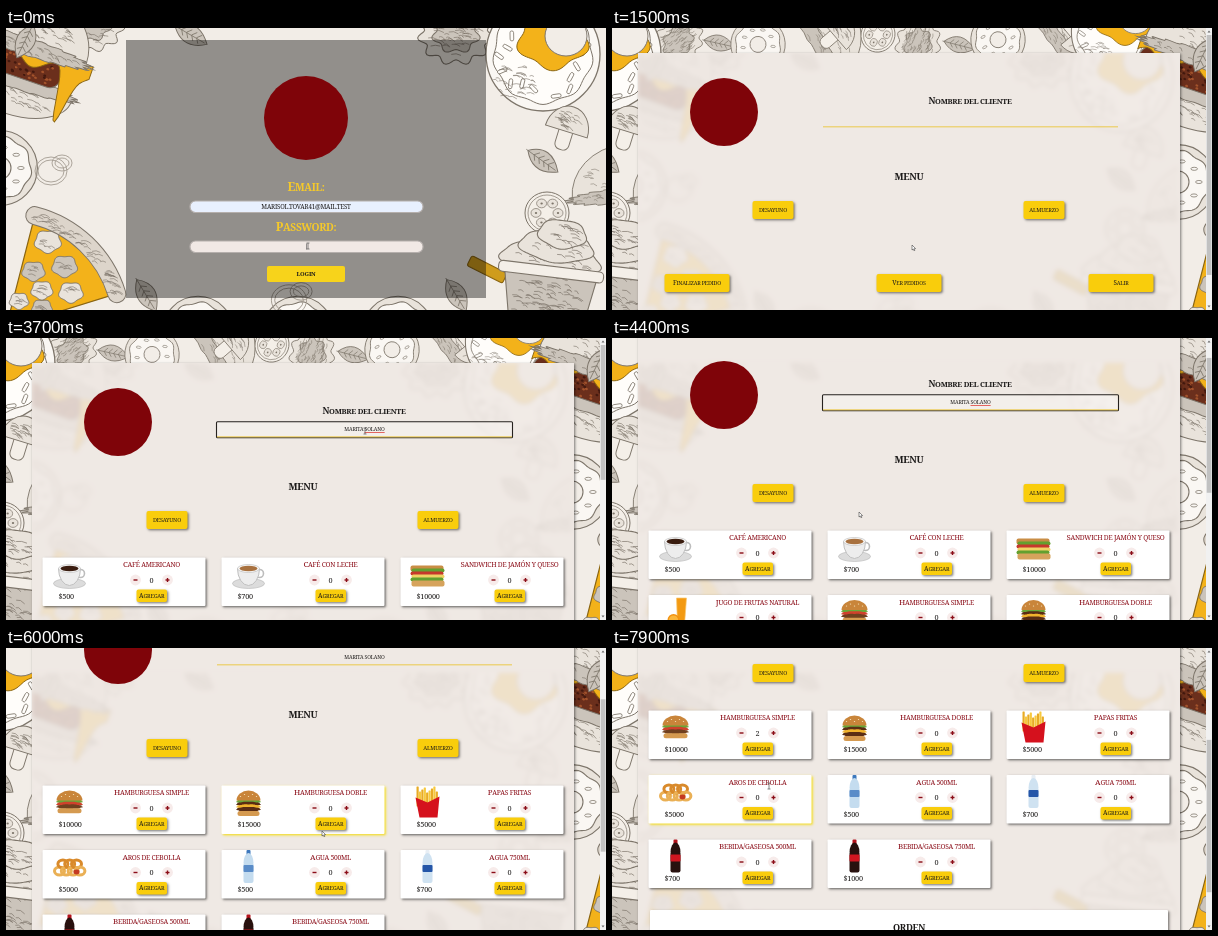
An HTML page with a canvas for the animation above (8000 ms loop, 600 by 282 pixels).

```html
<!DOCTYPE html>
<html lang="es">
<head>
<meta charset="utf-8">
<title>Pedidos</title>
<style>
html, body { margin: 0; width: 100%; height: 100%; overflow: hidden; background: #f1ece6; }
canvas { display: block; width: 600px; height: 282px; }
</style>
</head>
<body>
<canvas id="stage" width="600" height="282"></canvas>
<script>
const W = 600, H = 282, LOOP = 8000, TAU = Math.PI * 2;
const INK = '#7d756a', CREAM = '#f2ede7', YELLOW = '#f9cd0c', RED = '#7f0409', BLACK = '#1c1a19';
const CHEESE = '#f3b21a', OCHRE = '#8a6512', PALE = '#e9e3db', GREY = '#cbc4bb', WHITE = '#faf7f3';
const c = document.getElementById('stage').getContext('2d');

// ---------- shape helpers ----------
let seed = 7;
const rnd = () => (seed = (seed * 16807) % 2147483647) / 2147483647;
const loop = (n, fn) => { for (let i = 0; i < n; i++) fn(i); };

function paint(g, fill, stroke, w = 1) {
  if (fill) { g.fillStyle = fill; g.fill(); }
  if (stroke) { g.strokeStyle = stroke; g.lineWidth = w; g.stroke(); }
}
function oval(g, x, y, rx, ry, fill, stroke, w) {
  g.beginPath();
  g.ellipse(x, y, rx, ry, 0, 0, TAU);
  paint(g, fill, stroke, w);
}
// half an ellipse, rounded side up unless down is set
function dome(g, x, y, rx, ry, fill, stroke, down = false) {
  g.beginPath();
  g.ellipse(x, y, rx, ry, 0, 0, Math.PI, !down);
  g.closePath();
  paint(g, fill, stroke);
}
function box(g, x, y, w, h, r, fill, stroke, lw) {
  g.beginPath();
  g.roundRect(x, y, w, h, r);
  paint(g, fill, stroke, lw);
}
function poly(g, pts, fill, stroke, w) {
  g.beginPath();
  pts.forEach(p => g.lineTo(...p));
  g.closePath();
  paint(g, fill, stroke, w);
}
// ellipse with a wavy edge
function wavy(g, x, y, rx, ry, waves, depth, fill, stroke = INK) {
  g.beginPath();
  loop(96, i => {
    const a = i / 96 * TAU, k = 1 + depth * Math.sin(a * waves);
    g.lineTo(x + Math.cos(a) * rx * k, y + Math.sin(a) * ry * k);
  });
  g.closePath();
  paint(g, fill, stroke);
}
// short pen strokes scattered inside an ellipse
function hatch(g, n, x, y, rx, ry) {
  g.beginPath();
  loop(n, () => {
    const a = rnd() * TAU, r = Math.sqrt(rnd()), l = 4 + rnd() * 6;
    const px = x + Math.cos(a) * r * rx - l / 2, py = y + Math.sin(a) * r * ry;
    g.moveTo(px, py);
    g.quadraticCurveTo(px + l / 2, py - 1.5, px + l, py + 3 * rnd());
  });
  paint(g, null, INK, .6);
}
function put(g, draw, x, y, s = 1, r = 0) {
  g.save();
  g.translate(x, y);
  g.rotate(r);
  g.scale(s, s);
  draw(g);
  g.restore();
}

// ---------- sketched food ----------
function bun(g) {
  dome(g, 0, -22, 66, 58, PALE, INK);
  hatch(g, 50, 0, -44, 48, 16);
  wavy(g, 0, -20, 70, 9, 22, .07, GREY);
  hatch(g, 30, 0, -20, 60, 6);
}
function burger(g) {
  dome(g, 0, 20, 64, 34, PALE, INK, true);
  hatch(g, 50, 0, 34, 46, 12);
  wavy(g, 0, 18, 68, 8, 20, .06, GREY);
  box(g, -66, -16, 112, 30, 12, '#6b2f1c', INK);
  loop(70, i => oval(g, -60 + rnd() * 100, -8 + rnd() * 20, 1.6, 1.2, i % 2 ? '#a3532c' : '#43190f'));
  g.beginPath();
  g.moveTo(-70, -22);
  for (let x = -70; x <= 74; x += 2) g.lineTo(x, -7 + 6 * Math.sin(x * .13) + 50 * Math.exp(-(((x - 53) / 7) ** 2)));
  g.lineTo(74, -22);
  g.closePath();
  paint(g, CHEESE, OCHRE);
  bun(g);
}
function donut(g) {
  oval(g, 0, 0, 57, 57, WHITE, INK, 1.3);
  wavy(g, 0, 0, 49, 49, 9, .03, '#fffdfa');
  loop(18, i => put(g, () => box(g, -5, -1.8, 10, 3.6, 2, '#fffdfa', INK, .8),
    Math.cos(i * 2.4) * (36 + i % 2 * 8), Math.sin(i * 2.4) * (36 + i % 2 * 8), 1, i * 1.7));
  wavy(g, 10, -14, 34, 28, 5, .1, CHEESE, OCHRE);
  oval(g, 23, -18, 21, 20, CREAM, INK);
  hatch(g, 30, -30, 28, 22, 20);
}
function plainDonut(g) {
  oval(g, 0, 0, 34, 34, PALE, INK);
  wavy(g, 0, 0, 28, 28, 8, .04, WHITE);
  oval(g, 0, 0, 10, 10, CREAM, INK);
  loop(9, i => oval(g, Math.cos(i * .7) * 19, Math.sin(i * .7) * 19, 3, 1.4, null, INK, .7));
}
// wedge with its tip at the origin
function pizza(g) {
  const from = -1.32, to = -.3;
  g.beginPath();
  g.moveTo(0, 0);
  g.arc(0, 0, 112, from, to);
  g.closePath();
  paint(g, CHEESE, OCHRE, 1.2);
  loop(7, i => {
    const a = from + .2 + (i % 3) * .31, r = 96 - i * 11, s = 13 - i * .6;
    wavy(g, Math.cos(a) * r, Math.sin(a) * r, s, s * .85, 5, .08, i % 2 ? GREY : PALE);
    hatch(g, 6, Math.cos(a) * r, Math.sin(a) * r, s * .5, s * .5);
  });
  g.lineCap = 'round';
  for (const [w, col] of [[19, INK], [17, '#ddd5cb']]) {
    g.beginPath();
    g.arc(0, 0, 116, from, to);
    paint(g, null, col, w);
  }
  loop(60, () => {
    const a = from + rnd() * (to - from), r = 110 + rnd() * 10;
    hatch(g, 1, Math.cos(a) * r, Math.sin(a) * r, 1, 1);
  });
}
function cup(g) {
  put(g, () => box(g, -18, -5, 36, 10, 2, '#cf9c1c', OCHRE), -58, 12, 1, .35);
  loop(3, i => {
    wavy(g, -2 + i * 4, -4 - i * 12, 46 - i * 12, 15 - i, 5, .05, PALE);
    hatch(g, 16, i * 4, -4 - i * 12, 36 - i * 10, 9);
  });
  poly(g, [[-42, 10], [42, 10], [30, 80], [-28, 80]], GREY, INK);
  hatch(g, 110, 0, 40, 30, 34);
  box(g, -48, 2, 96, 10, 4, '#f4efe8', INK);
}
function leaf(g) {
  g.beginPath();
  g.moveTo(-18, 0);
  g.quadraticCurveTo(0, -20, 21, 1);
  g.quadraticCurveTo(0, 19, -18, 0);
  paint(g, GREY, INK);
  g.beginPath();
  g.moveTo(-20, 0);
  g.lineTo(18, 1);
  for (const s of [-1, 1]) loop(4, i => { g.moveTo(i * 6 - 10, 0); g.lineTo(i * 6 - 6, 5 * s); });
  paint(g, null, INK, .8);
}
function onion(g) {
  loop(4, i => oval(g, i > 1 ? 11 : 0, i > 1 ? -6 : 2, 16 - i * 3, 14 - i * 3, null, '#a49c92', .9));
}
function mushroom(g) {
  box(g, -8, 0, 15, 26, 6, '#f4efe8', INK);
  dome(g, 0, 6, 23, 27, PALE, INK);
  hatch(g, 24, 0, -6, 13, 9);
}
function tomato(g) {
  oval(g, 0, 0, 22, 21, '#f4efe8', INK);
  oval(g, 0, 0, 19, 18, null, INK, .7);
  loop(6, i => {
    const x = Math.cos(i * 1.05) * 11, y = Math.sin(i * 1.05) * 11;
    oval(g, x, y, 5, 4.4, PALE, INK, .7);
    oval(g, x, y, 1.2, 1, INK);
  });
}
function lettuce(g) {
  wavy(g, 0, 0, 32, 26, 11, .1, PALE);
  wavy(g, 0, 0, 20, 16, 7, .12, GREY);
  hatch(g, 60, 0, 0, 24, 20);
}

// ---------- backdrops ----------
function layer(draw) {
  const cv = document.createElement('canvas');
  cv.width = W;
  cv.height = H;
  const g = cv.getContext('2d');
  g.fillStyle = CREAM;
  g.fillRect(0, 0, W, H);
  draw(g);
  return cv;
}
function scenery(g) {
  loop(3, i => put(g, plainDonut, 192 + i * 100, 304, 1.05));
  put(g, plainDonut, -6, 140, 1.1);
  put(g, lettuce, 84, -4);
  put(g, lettuce, 450, 6, 1.1);
  put(g, burger, 14, 36, .95, .33);
  put(g, pizza, 0, 300);
  put(g, onion, 45, 141);
  put(g, onion, 283, 270, 1.1);
  put(g, donut, 537, 26);
  put(g, mushroom, 562, 98, .95, .3);
  put(g, tomato, 541, 185);
  put(g, bun, 624, 184, .85, -.1);
  put(g, cup, 546, 236, 1.1, .12);
  for (const [x, y, r] of [[20, 12, 2], [184, 6, .5], [140, 266, 1], [450, 266, 1], [536, 132, .6]]) put(g, leaf, x, y, .95, r);
}
const loginBg = layer(scenery);
// the same drawing repeats past both sides, with a row of trimmings between
const menuBg = layer(g => {
  const trimmings = [lettuce, leaf, plainDonut, bun, mushroom, tomato];
  loop(12, i => put(g, trimmings[i % 6], 66 + i * 40, 4 + rnd() * 14, .8, rnd() * 3));
  put(g, donut, 505, 4, .8);
  put(g, scenery, -545, 0);
  put(g, scenery, 572, 14);
});
const frost = layer(g => {
  g.filter = 'blur(2px)';
  g.drawImage(loginBg, 26, 25, W * .9, H * .95);
  g.filter = 'none';
  g.fillStyle = 'rgba(239,233,228,.87)';
  g.fillRect(0, 0, W, H);
});

// ---------- text ----------
// small < 1 sets the letters after the first as small capitals; align 0 left, .5 centre
function txt(s, x, y, size, color, { weight = 500, align = .5, small = 1 } = {}) {
  const runs = [[s[0] || '', size], [s.slice(1), size * small]].map(r => [r[0].toUpperCase(), r[1]]);
  const set = z => {
    c.font = `${weight} ${z}px "Noto Serif", serif`;
    c.letterSpacing = `${-.03 * size}px`;
  };
  const widths = runs.map(([str, z]) => (set(z), c.measureText(str).width));
  const full = widths[0] + widths[1];
  let px = x - full * align;
  c.fillStyle = color;
  runs.forEach(([str, z], i) => { set(z); c.fillText(str, px, y + size * .34); px += widths[i]; });
  return full;
}
const caps = (s, x, y, size, color, weight) => txt(s, x, y, size, color, { weight, small: .85 });

// ---------- product pictures ----------
const coffee = brew => g => {
  oval(g, 0, 9, 16, 5, '#dcdcdc', '#b5b5b5', .6);
  oval(g, 11, -1, 4, 4, null, '#bdbdbd', 1.6);
  dome(g, 0, -6, 11, 17, '#ededed', '#c0c0c0', true);
  oval(g, 0, -6, 11, 4, '#f7f7f7', '#b9b9b9', .6);
  oval(g, 0, -6, 9, 2.8, brew);
};
const stack = (w, fillings) => g => {
  fillings.forEach((col, i) => wavy(g, 0, -1 + i * 2.6, w, 2.4, 9, .05, col, null));
  box(g, -w + 1, fillings.length * 2.6 - 2, w * 2 - 2, 5, 2.5, '#d59a50');
  dome(g, 0, -2, w, 10, '#c9853a');
  loop(5, i => oval(g, i * 4 - 8, -6 - i % 2 * 2, .7, .5, '#f6e3b8'));
};
const sandwich = g => ['#c98d45', '#63a02f', '#c6382c', '#f0d264', '#63a02f', '#d6a35c'].forEach((col, i) =>
  box(g, -17 + i % 2, -9 + i * 3, 33, i % 5 ? 4 : 6, 2, col));
function juice(g) {
  poly(g, [[1, -14], [11, -14], [9, 13], [2, 13]], '#f39a12', '#f8c772', .7);
  oval(g, -2, 8, 6, 6, '#f29212');
  oval(g, -2, 8, 4.6, 4.6, '#fbb63a');
}
function fries(g) {
  loop(9, i => box(g, -11 + i * 2.4, -16 + (i * 5) % 7, 2.2, 20, .4, i % 2 ? '#f7c93e' : '#e8ab25'));
  poly(g, [[-12, -5], [0, 0], [12, -6], [10, 15], [-8, 15]], '#d5111d');
}
function rings(g) {
  loop(7, i => oval(g, -10 + i * 3.4, i % 2 ? -3 : 4, 5, 4, null, i % 2 ? '#d98a2b' : '#eab055', 3));
  oval(g, 7, 5, 3, 2.4, '#c43a21');
}
const bottle = (body, label, cap) => g => {
  box(g, -2, -17, 4, 6, 1, cap);
  dome(g, 0, -4, 5, 10, body);
  box(g, -5, -5, 10, 21, 2, body);
  box(g, -5, -2, 10, 7, 1, label);
};

const PRODUCTS = [
  ['Café americano', 500, coffee('#3a1d10')],
  ['Café con leche', 700, coffee('#a8713f')],
  ['Sandwich de jamón y queso', 10000, sandwich],
  ['Jugo de frutas natural', 800, juice],
  ['Hamburguesa simple', 10000, stack(13, ['#69a738', '#d0412c', '#70401f'])],
  ['Hamburguesa doble', 15000, stack(12, ['#69a738', '#5a2d14', '#f1b32d', '#5a2d14'])],
  ['Papas fritas', 5000, fries],
  ['Aros de cebolla', 5000, rings],
  ['Agua 500ml', 500, bottle('#c4dcef', '#5a8cc8', '#3d78bd')],
  ['Agua 750ml', 700, bottle('#cfe2f1', '#2556a8', '#e8eef4')],
  ['Bebida/gaseosa 500ml', 700, bottle('#28110e', '#cf1620', '#b5141c')],
  ['Bebida/gaseosa 750ml', 1000, bottle('#28110e', '#cf1620', '#b5141c')]
];

// ---------- timeline ----------
const MENU_AT = 1100, LOADED = 1700, FOCUS = 2200, TYPE = 2500, BREAKFAST = 5000, LUNCH = 5600;
const CLIENT = 'Marita Solano';
function ease(t, from, to) {
  const p = Math.min(1, Math.max(0, (t - from) / (to - from)));
  return p * p * (3 - 2 * p);
}
const scrollAt = t => 27 * ease(t, 3900, 4300) + 12 * ease(t, 4600, 4750)
  + 43 * ease(t, 5650, 5900) + 75 * ease(t, 7250, 7750);

// each stop: arrival time and place
const STOPS = [[1000, 300, 246], [1400, 300, 217], [2200, 359, 93], [4300, 247, 174], [4900, 165, 145],
  [5500, 443, 144], [6000, 316, 183], [6600, 160, 160], [7700, 157, 138]];
let mx, my;
function movePointer(t) {
  [mx, my] = [302, 218];
  for (const [at, x, y] of STOPS) {
    const p = ease(t, at - 300, at);
    mx += (x - mx) * p;
    my += (y - my) * p;
  }
}
const over = (x, y, w, h) => mx >= x && mx <= x + w && my >= y && my <= y + h;

// ---------- widgets ----------
function shadowBox(x, y, w, h, r, fill, color = 'rgba(0,0,0,.5)') {
  c.save();
  c.shadowColor = color;
  c.shadowBlur = 2.5;
  c.shadowOffsetX = c.shadowOffsetY = 1.3;
  box(c, x, y, w, h, r, fill);
  c.restore();
}
function button(label, x, y, w, h, size, style = {}) {
  const hot = over(x, y, w, h);
  shadowBox(x, y, w, h, 2, hot ? RED : YELLOW);
  txt(label, x + w / 2, y + h / 2, size, hot ? '#fff' : BLACK, style);
}
function pointer(ibeam) {
  if (ibeam) {
    c.beginPath();
    for (const s of [-1, 1]) {
      c.moveTo(mx - 1.5, my + 3 * s);
      c.lineTo(mx + 1.5, my + 3 * s);
    }
    c.moveTo(mx, my - 3);
    c.lineTo(mx, my + 3);
    paint(c, null, '#555', .7);
  } else {
    put(c, () => poly(c, [[0, 0], [0, 5.6], [1.3, 4.5], [2.2, 6.4], [3.1, 6], [2.3, 4.1], [4, 4]], '#fff', '#333', .6), mx, my, .9);
  }
}
function caret(x, y) {
  c.fillStyle = '#555';
  c.fillRect(x, y, .6, 6);
}

// ---------- pages ----------
function login(t) {
  c.drawImage(loginBg, 0, 0);
  c.fillStyle = 'rgba(0,0,0,.4)';
  c.fillRect(120, 12, 360, 258);
  oval(c, 300, 90, 42, 42, RED);
  ['Email:', 'Password:'].forEach((label, i) => {
    const y = 159 + i * 40;
    caps(label, 300, y, 12, '#f5c92a', 600);
    box(c, 184, y + 14, 233, 11.5, 5.5, i ? '#f1e9e5' : '#e8f0fe', '#b5afac', 1.2);
  });
  txt('marisol.tovar41@mail.test', 300, 179, 6.2, BLACK);
  const dots = Math.max(0, Math.min(6, Math.floor((t - 100) / 100)));
  loop(dots, i => oval(c, 300 + (i - (dots - 1) / 2) * 3.6, 219, 1.2, 1.2, BLACK));
  if (t < 800) caret(300 + dots * 1.8, 215.5);
  const hot = over(261, 238, 78, 16);
  box(c, 261, 238, 78, 16, 2, hot ? RED : '#f7d31b');
  txt('Login', 300, 246, 5.9, hot ? '#fff' : BLACK, { weight: 700 });
  pointer(t < 850);
}

function card([name, price, picture], x, y, qty) {
  const hot = over(x, y, 163, 49);
  shadowBox(x, y, 163, 48.5, 1, '#fff', hot ? '#f3dc1e' : 'rgba(0,0,0,.55)');
  put(c, picture, x + 27, y + 17);
  caps(name, x + 109, y + 7, 7.9, '#8b0d18');
  txt('$' + price, x + 16, y + 39.5, 7.3, BLACK, { align: 0 });
  for (const d of [-16, 16]) {
    oval(c, x + 109 + d, y + 22.5, 5.4, 5.4, '#f7ebea');
    c.fillStyle = '#8b0d18';
    c.fillRect(x + 107 + d, y + 21.8, 4, 1.4);
    if (d > 0) c.fillRect(x + 108.3 + d, y + 20.5, 1.4, 4);
  }
  txt(String(qty), x + 109, y + 23, 7.3, BLACK);
  button('Agregar', x + 94, y + 32, 30.5, 12.5, 6.4, { small: .85 });
}

function clientField(t, sy) {
  caps('Nombre del cliente', 358, 73.5 - sy, 8.8, BLACK, 700);
  const focused = t >= FOCUS && t < BREAKFAST;
  if (focused) box(c, 210.5, 83.7 - sy, 296, 16, 1, 'rgba(255,255,255,.25)', '#26221f', 1.1);
  c.fillStyle = '#ecc63a';
  c.fillRect(211, 98.4 - sy, 295, .9);
  const name = CLIENT.slice(0, Math.max(0, Math.floor((t - TYPE) / 85)));
  const w = name ? txt(name, 358.5, 91.3 - sy, 5.1, BLACK) : 0;
  if (!focused) return;
  if (t % 1000 < 400) caret(358.5 + w / 2, 88 - sy);
  if (name === CLIENT) {
    c.fillStyle = '#e0433c';
    c.fillRect(358.5, 94.2 - sy, w / 2, .8);
  }
}

function scrollbar(sy, full) {
  c.fillStyle = '#f1f1f1';
  c.fillRect(594, 0, 6, H);
  c.fillStyle = '#c1c1c1';
  c.fillRect(594.7, 7 + sy * 268 / full, 4.8, 268 * H / full);
  for (const [y, d] of [[4.5, -2], [277.5, 2]]) poly(c, [[595.5, y], [598.5, y], [597, y + d]], '#666');
}

function menu(t) {
  const sy = scrollAt(t), top = 25 - sy;
  const list = t < LOADED ? [] : t < BREAKFAST ? PRODUCTS : t < LUNCH ? PRODUCTS.slice(0, 4) : PRODUCTS.slice(4);
  const order = 225.5 + Math.ceil(list.length / 3) * 64.5;

  c.drawImage(menuBg, 0, 0);
  shadowBox(26, top, 542, 600, 0, '#efe9e4');
  c.save();
  c.beginPath();
  c.rect(26, top, 542, 600);
  c.clip();
  c.drawImage(frost, 0, 0);
  c.restore();

  oval(c, 112, 84 - sy, 34, 34, RED);
  clientField(t, sy);
  txt('Menu', 297, 149 - sy, 9.6, BLACK, { weight: 700 });
  button('Desayuno', 140.5, 173 - sy, 41, 18, 5.5);
  button('Almuerzo', 411.5, 173 - sy, 41, 18, 5.5);

  const picked = (t >= 6700) + (t >= 7000);
  list.forEach((p, i) =>
    card(p, 36.5 + (i % 3) * 179, 219.5 + Math.floor(i / 3) * 64.5 - sy, t >= LUNCH && i === 0 ? picked : 0));

  if (list.length) {
    shadowBox(38, order - 6 - sy + 6, 518, 34, 1, '#fff');
    txt('Orden', 297, order + 18 - sy, 9, BLACK, { weight: 700 });
  }
  const by = (list.length ? order + 46 : 246) - sy;
  ['Finalizar pedido', 'Ver pedidos', 'Salir'].forEach((label, i) =>
    button(label, 52.5 + i * 212, by, 65, 18, 6.3, { small: .85 }));

  scrollbar(sy, list.length ? order + 77 : 315);
  pointer((t >= 2100 && t < 4100) || t >= 7600);
}

const start = performance.now();
function frame(now) {
  const t = Math.floor(Math.max(0, now - start) % LOOP / 100) * 100;
  movePointer(t);
  c.clearRect(0, 0, W, H);
  (t < MENU_AT ? login : menu)(t);
  requestAnimationFrame(frame);
}
frame(start);
</script>
</body>
</html>
```
